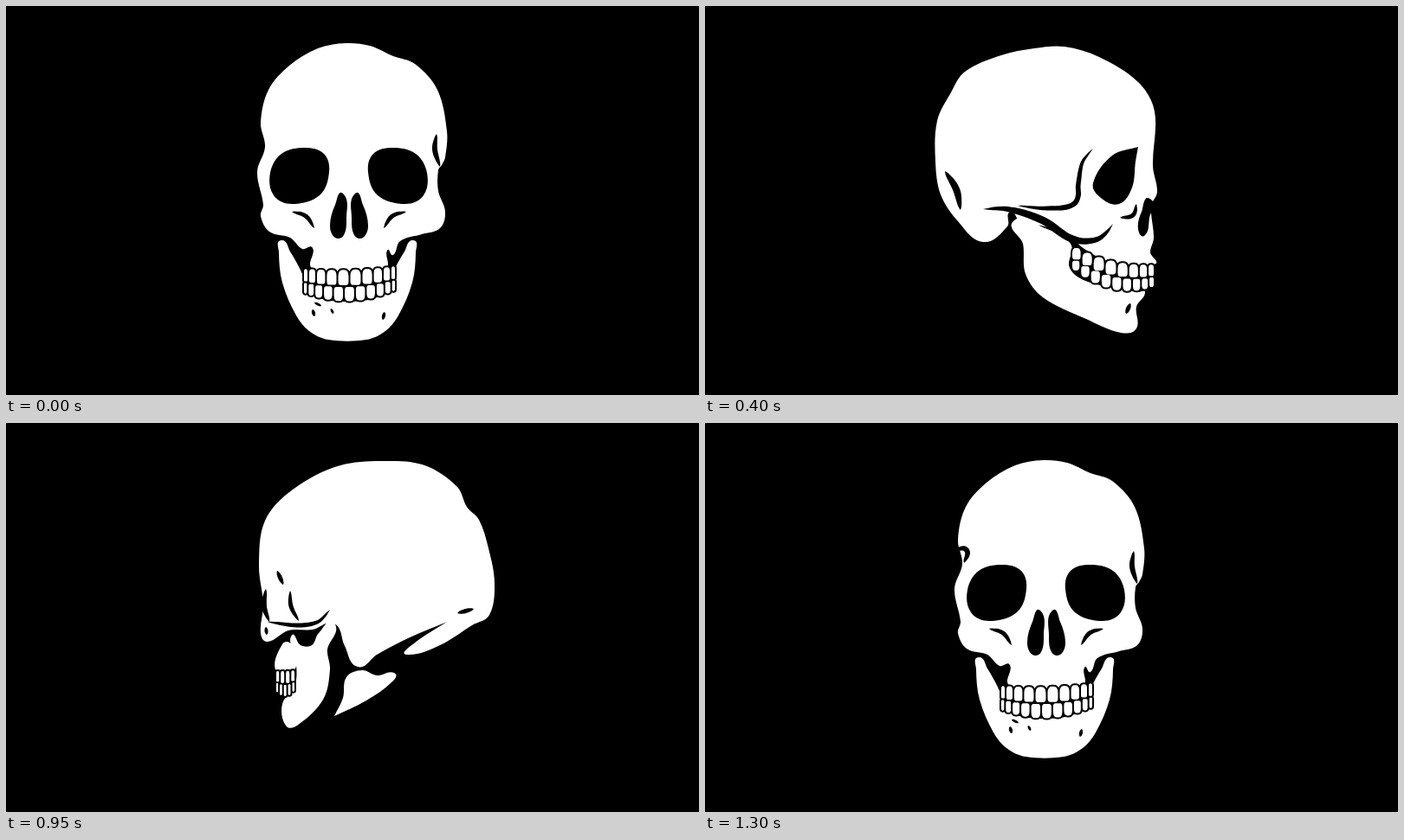
Animation of 800x450 px, one loop 1.35 s. Source, as an HTML page:

```html
<!DOCTYPE html>
<html lang="en">
<head>
<meta charset="utf-8">
<title>Turning skull</title>
<style>
html, body { margin: 0; width: 100%; height: 100%; overflow: hidden; background: #000; }
svg { display: block; width: 100vw; height: 100vh; }
#teeth { stroke: #000; stroke-width: 4; stroke-linejoin: round; paint-order: stroke; }
</style>
</head>
<body>
<svg viewBox="0 0 800 450">
  <path id="bone" fill="#fff"/>
  <path id="dark" fill="#000"/>
  <path id="teeth" fill="#fff"/>
</svg>
<script>
const STEP = 50, STEPS = 27, N = 120;

const numbers = str => str.match(/[\d.]+/g).map(Number);
const lerp = (a, b, u) => a + (b - a) * u;
const mix = (a, b, u) => a.map((v, i) => lerp(v, b[i], u));
const dist = (a, b) => Math.hypot(b[0] - a[0], b[1] - a[1]);
const flip = (str, w) => str.replace(/(\d+),/g, (m, x) => (w - x) + ",");
const both = (half, w) => half + " " + flip(half, w).split(" ").reverse().join(" ");

// A shape is a few points on a smooth outline (a repeated point is a corner),
// or "width|points" for a brush mark with tapered ends. Capitalised names are bone.
// Teeth: x from, x to, arch angle from, to, count, gum height left, middle, right, tooth height.
const eye = "345,164 367,171 373,192 362,219 330,229 309,219 305,193 318,171";
const nose = "390,218 380,230 374,254 380,268 390,265 393,245";
const cheek = "5|330,238 346,243 356,257";

const front = {
  Skull: "392,43 420,46 447,58 472,67 498,97 509,145 507,175 503,184 499,190 499,214 507,238 501,257 480,264 455,272 447,288 440,283 438,304 397,309 354,304 354,280 342,281 328,268 304,261 294,243 297,230 290,192 299,163 294,135 303,97 327,69 360,49",
  Jaw: both("372,386 350,376 335,358 319,320 315,285 318,271 328,284 342,310 347,328 370,340", 788),
  eyeL: eye, eyeR: flip(eye, 791),
  noseL: nose, noseR: flip(nose, 792),
  cheekL: cheek, cheekR: flip(cheek, 792),
  temR: "6|497,148 495,166 501,186",
  chinL: "4|354,351 356,359", chinR: "4|437,354 435,363",
  dotA: "3|356,343 364,347", dotB: "3|375,350 378,356",
  teeth: [343, 450, -72, 72, 10, 303, 304, 300, 20]
};

const turned = {
  Skull: "380,48 425,52 465,65 500,96 516,125 517,180 514,222 514,250 488,265 480,285 481,303 440,305 400,304 380,294 362,272 338,266 312,253 300,236 288,208 284,155 296,112 320,73 350,54",
  Jaw: "323,271 344,270 347,286 366,305 378,326 415,340 455,340 481,331 475,362 458,385 420,387 385,369 350,337 326,305",
  Ear: "10|288,247 298,261 311,271",
  eyeL: "410,163 375,165 347,182 346,219 378,230 412,219 421,206 414,185",
  eyeR: "490,166 513,176 509,200 508,222 492,228 468,208 461,183 470,171",
  noseL: "445,215 433,232 424,256 434,270 441,262 442,238",
  noseR: "452,216 462,235 462,260 452,270 447,255 447,230",
  cheekL: "5|365,242 382,241 392,251", cheekR: "4|499,239 484,244 475,257",
  temL: "9|329,132 336,158 330,185 324,220 312,234 288,237",
  gum: "3|453,284 453,293", dotB: "3|450,350 462,349",
  chinL: "4|395,355 404,360 406,367", chinR: "4|471,350 467,362",
  teeth: [375, 482, -50, 72, 10, 295, 304, 300, 19]
};

const side = {
  Skull: "415,47 455,59 500,88 519,122 517,185 522,215 515,232 518,268 514,285 518,299 468,296 438,281 420,266 395,256 362,247 352,238 349,255 321,273 292,249 272,218 266,180 268,133 284,100 300,76 342,57 380,49",
  Jaw: "357,248 390,256 422,275 421,303 442,319 500,331 508,332 498,348 498,373 480,378 440,362 390,337 370,310 367,275",
  eyeL: "500,163 500,163 470,173 448,205 457,222 478,229 493,210 497,180",
  noseL: "515,224 504,238 500,258 508,265 513,245",
  cheekL: "5|498,229 494,242 479,245",
  temL: "6|448,165 436,180 431,205 427,228 395,234 361,231",
  archL: "9|321,235 350,235 390,248 425,270 455,269 471,252",
  backL: "8|277,191 290,212 295,236",
  chinL: "5|491,344 486,356",
  teeth: [423, 519, -40, 62, 8, 276, 294, 298, 18]
};

const rear = {
  Skull: "370,44 430,49 485,77 517,113 524,165 519,210 522,243 514,253 490,240 462,239 437,232 425,258 410,282 388,268 352,249 307,230 307,230 345,255 353,268 315,257 278,234 258,222 252,185 259,145 270,112 284,97 295,74 330,50",
  Jaw: "436,233 455,243 463,257 476,257 487,247 482,270 482,302 497,325 493,350 480,350 450,320 442,285 445,262",
  Maxilla: "486,257 497,256 504,288 483,286",
  Ramus: "368,289 388,292 405,286 423,294 427,318 437,339 437,339 400,321 371,300",
  temL: "5|442,216 456,230 480,234 514,230",
  strutA: "5|488,194 487,212 478,229", strutB: "6|516,192 518,212 512,230",
  backL: "5|276,215 295,220", cheekL: "5|503,171 496,187", dotB: "4|516,236 515,245",
  teeth: [482, 505, -30, 40, 4, 285, 286, 286, 16]
};

const behind = {
  Skull: "400,38 440,50 490,70 517,118 522,185 518,222 508,237 501,243 498,265 486,273 468,262 440,266 390,260 335,250 303,232 300,219 287,200 281,175 282,140 292,100 320,64 360,49",
  Jaw: "328,275 345,279 365,291 420,295 456,292 464,283 475,283 472,315 462,333 442,345 390,345 345,320 328,306",
  Ear: "10|294,249 304,259 313,266",
  LumpL: "352,268 368,267 370,287 356,284", LumpM: "432,269 446,268 438,281", LumpR: "13|460,265 456,289",
  temL: "7|326,217 350,231 379,240", temR: "6|502,215 502,230 500,244",
  backL: "8|292,187 296,200 301,214",
  wedge: "430,290 455,291 445,325 442,343 442,343 436,325", slit: "8|469,280 466,298 467,317",
  cheekR: "4|468,247 455,251 445,260",
  dotA: "4|402,229 412,225", dotB: "4|468,225 475,222",
  chinL: "6|377,295 379,314", chinR: "4|412,309 424,311",
  teeth: [373, 423, -30, 30, 4, 272, 273, 272, 10]
};

const left = {
  Skull: "380,49 445,55 500,75 530,110 531,150 528,195 512,235 500,258 486,275 470,253 450,253 398,273 388,288 340,300 296,301 298,270 299,255 288,240 288,225 299,217 294,185 290,140 301,98 330,65",
  Jaw: "458,249 457,275 450,325 440,337 395,360 350,379 318,376 308,358 314,348 300,338 345,331 395,309 408,288 410,271 435,261",
  Ear: "13|273,174 274,186 276,199",
  eyeR: "327,160 355,160 383,172 394,200 380,220 355,230 330,218 321,190",
  noseL: "4|294,222 300,240 298,254", noseR: "7|292,205 314,228 321,248 315,267",
  cheekL: "7|319,222 329,235 341,243", cheekR: "6|355,248 367,260",
  temR: "7|398,161 397,190 410,222 440,232 474,231",
  archR: "6|375,279 400,268 430,262 460,242 497,233", gapR: "400,272 410,271 408,290 398,306",
  backR: "6|511,159 504,185", top: "6|444,61 453,70 455,85",
  brow: "4|297,167 298,189", dotA: "4|304,162 302,175",
  teeth: [290, 399, -62, 50, 9, 303, 301, 278, 18]
};

function remake(pose, rename, shape, teeth) {
  const out = {};
  for (const k in pose) out[rename(k)] = k === "teeth" ? teeth(pose[k]) : shape(pose[k]);
  return out;
}

const mirror = (pose, w) => remake(pose,
  k => k.replace(/[LR]$/, c => c === "L" ? "R" : "L"),
  s => flip(s, w),
  ([x0, x1, a, b, n, l, m, r, h]) => [w - x1, w - x0, -b, -a, n, r, m, l, h]);

const nudge = (pose, dx) => remake(pose, k => k,
  s => s.replace(/(\d+),/g, (m, x) => (+x + dx) + ","),
  t => t.map((v, i) => i < 2 ? v + dx : v));

const pairs = str => {
  const n = numbers(str);
  return n.filter((v, i) => i % 2 === 0).map((x, i) => [x, n[2 * i + 1]]);
};

function clockwise(pts) {
  const area = pts.reduce((s, p, i) => {
    const q = pts[(i + 1) % pts.length];
    return s + p[0] * q[1] - q[0] * p[1];
  }, 0);
  return area < 0 ? pts.reverse() : pts;
}

function unit(a, b) {
  const d = dist(a, b) || 1;
  return [(b[0] - a[0]) / d, (b[1] - a[1]) / d];
}

// Handles follow the chord through the neighbours, with the length of a round arc
function beziers(pts, closed) {
  const n = pts.length, out = [];
  const at = i => closed ? pts[(i + n) % n] : pts[Math.max(0, Math.min(n - 1, i))];
  for (let i = 0; i < (closed ? n : n - 1); i++) {
    const a = at(i), b = at(i + 1), d = dist(a, b), c = unit(a, b);
    if (!d) continue;
    const reach = t => d * 2 / 3 / (1 + Math.max(0, t[0] * c[0] + t[1] * c[1]));
    const s = unit(at(i - 1), b), e = unit(a, at(i + 2)), p = reach(s), q = reach(e);
    out.push([a, [a[0] + s[0] * p, a[1] + s[1] * p], [b[0] - e[0] * q, b[1] - e[1] * q], b]);
  }
  return out;
}

// n points evenly spaced along the curves
function sample(curves, n) {
  const line = [curves[0][0]], len = [0];
  for (const [a, b, c, d] of curves) for (let k = 1; k <= 8; k++) {
    const t = k / 8, s = 1 - t, last = line.length - 1;
    const p = a.map((v, j) => s*s*s*v + 3*s*s*t*b[j] + 3*s*t*t*c[j] + t*t*t*d[j]);
    len.push(len[last] + dist(line[last], p));
    line.push(p);
  }
  const total = len[len.length - 1], out = [];
  for (let i = 0, k = 1; i < n; i++) {
    const want = total * i / n;
    while (len[k] < want) k++;
    out.push(mix(line[k - 1], line[k], (want - len[k - 1]) / (len[k] - len[k - 1] || 1)));
  }
  return out;
}

// Outline of a tapered brush mark along a centre line
function brush(width, pts) {
  const mid = sample(beziers(pts, false), 14).concat([pts[pts.length - 1]]), last = mid.length - 1;
  const edge = dir => mid.map((p, i) => {
    const t = unit(mid[Math.max(0, i - 1)], mid[Math.min(last, i + 1)]);
    const r = dir * width / 2 * Math.sin(Math.PI * i / last) ** .6;
    return [p[0] - t[1] * r, p[1] + t[0] * r];
  });
  return edge(1).concat(edge(-1).reverse());
}

function shape(str) {
  const [width, line] = str.split("|");
  const pts = line ? brush(+width, pairs(line)) : pairs(str);
  const curves = beziers(clockwise(pts), true);
  return { curves, ring: sample(curves, N) };
}

// Start the second ring where it lies closest to the first
function align(a, b) {
  let best = Infinity, off = 0;
  for (let s = 0; s < N; s++) {
    const sum = a.reduce((t, p, i) => t + dist(p, b[(i + s) % N]) ** 2, 0);
    if (sum < best) { best = sum; off = s; }
  }
  return b.slice(off).concat(b.slice(0, off));
}

// Flatten a shape onto its outer side, where it turns out of sight
function squash(pts) {
  const xs = pts.map(p => p[0]), lo = Math.min(...xs), hi = Math.max(...xs);
  return pts.map(p => [lo + hi > 800 ? hi : lo, p[1]]);
}

function build(step, { teeth, ...rest }) {
  const shapes = {};
  for (const k in rest) shapes[k] = shape(rest[k]);
  return { step, shapes, teeth };
}

const poses = [
  build(0, front), build(4, turned), build(8, side), build(12, rear), build(16, behind),
  build(19, mirror(rear, 816)), build(21, mirror(side, 812)), build(22, left),
  build(26, { ...nudge(front, -2), notchL: "6|288,147 302,147 299,162" })
];

const fix = p => p[0].toFixed(1) + " " + p[1].toFixed(1);
const smooth = curves => "M" + fix(curves[0][0]) + curves.map(c => "C" + c.slice(1).map(fix).join(" ")).join("") + "Z";
const poly = pts => "M" + pts.map(fix).join("L") + "Z";

function tooth(x0, x1, y0, y1, r0, r1) {
  const w = x1 - x0, a = w * r0, b = w * r1, h = (y1 - y0) * .45;
  const p = Math.min(a * 1.5, h), q = Math.min(b * 1.5, h);
  return `M${x0 + a} ${y0}H${x1 - a}Q${x1} ${y0} ${x1} ${y0 + p}V${y1 - q}` +
    `Q${x1} ${y1} ${x1 - b} ${y1}H${x0 + b}Q${x0} ${y1} ${x0} ${y1 - q}` +
    `V${y0 + p}Q${x0} ${y0} ${x0 + a} ${y0}Z`;
}

// Two rows of equal teeth on a round arch, seen from one side
function bite([x0, x1, a, b, count, l, m, r, h]) {
  const sin = deg => Math.sin(deg * Math.PI / 180);
  const across = u => (sin(lerp(a, b, u)) - sin(a)) / (sin(b) - sin(a));
  let d = "";
  for (const upper of [true, false]) {
    const n = Math.round(count) + (upper ? 0 : 1);
    for (let i = 0; i < n; i++) {
      const e0 = across(i / n), e1 = across((i + 1) / n), u = (e0 + e1) / 2, k = (2 * u - 1) ** 2;
      const gum = l * (1 - u) * (1 - 2 * u) + m * 4 * u * (1 - u) + r * u * (2 * u - 1);
      const edge = gum + h * (1 - .2 * k);
      const left = lerp(x0, x1, e0) + 1, right = lerp(x0, x1, e1) - 1;
      if (right - left < 1) continue;
      d += upper ? tooth(left, right, gum + 1, edge - 1, .42, .25)
        : tooth(left, right, edge + 1, edge + h * (.88 - .25 * k), .25, .42);
    }
  }
  return d;
}

function draw(step) {
  let i = poses.length - 1;
  while (poses[i].step > step) i--;
  const a = poses[i], b = poses[i + 1] || a;
  const u = a === b ? 0 : (step - a.step) / (b.step - a.step);
  const out = { bone: "", dark: "", teeth: bite(mix(a.teeth, b.teeth, u)) };
  for (const k of new Set(Object.keys(u ? { ...a.shapes, ...b.shapes } : a.shapes))) {
    const p = a.shapes[k], q = b.shapes[k];
    const layer = k[0] < "a" ? "bone" : "dark";
    if (!u) { out[layer] += smooth(p.curves); continue; }
    const from = p ? p.ring : squash(q.ring);
    const to = !q ? squash(p.ring) : p ? align(from, q.ring) : q.ring;
    out[layer] += poly(from.map((v, j) => mix(v, to[j], u)));
  }
  return out;
}

const cells = Array.from({ length: STEPS }, (_, i) => draw(i));
const parts = ["bone", "dark", "teeth"].map(id => document.getElementById(id));
const start = performance.now();
let shown = -1;

function show(now) {
  const step = Math.floor(Math.max(0, now - start) / STEP) % STEPS;
  if (step !== shown) for (const el of parts) el.setAttribute("d", cells[step][el.id]);
  shown = step;
  requestAnimationFrame(show);
}
show(start);
</script>
</body>
</html>
```
